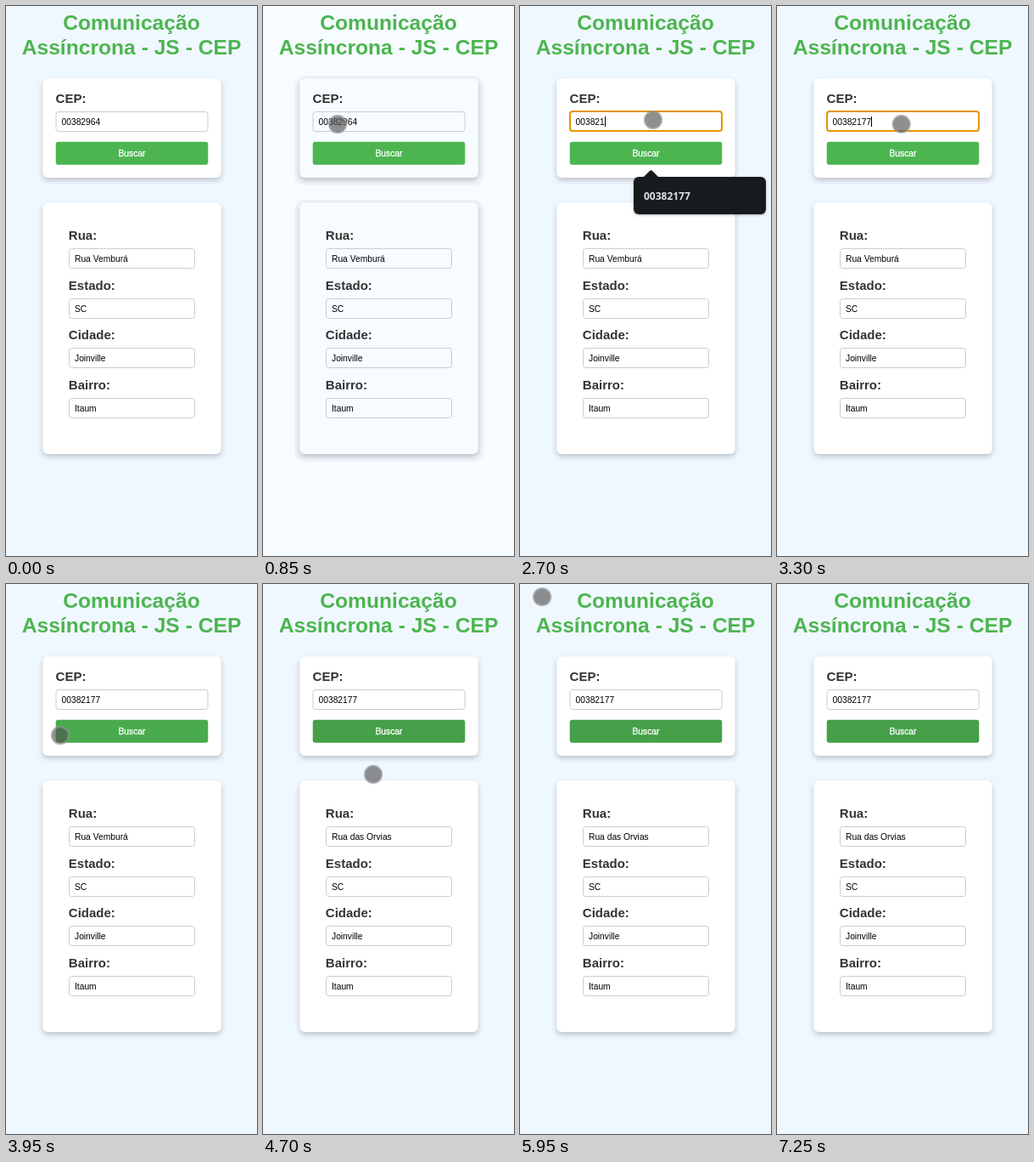
An HTML page for the animation above (7500 ms loop, 296x647 px).

```html
<!DOCTYPE html>
<html lang="pt-BR">
<head>
<meta charset="utf-8">
<title>CEP</title>
<style>
  html, body { margin: 0; width: 100%; height: 100%; overflow: hidden; background: #f0f8ff; }
  svg { display: block; width: 296px; height: 647px; font-family: "Liberation Sans", Arial, sans-serif; }
  .page { fill: #f0f8ff; }
  .title { font-size: 24.64px; font-weight: bold; fill: #4cb550; text-anchor: middle; }
  .label { font-size: 15px; font-weight: bold; fill: #333; }
  .value { font-size: 10.27px; fill: #000; }
  .card { fill: #fff; filter: drop-shadow(.5px 3px 3.1px rgba(0, 0, 0, .22)); }
  .halo { fill: none; }
  .field { fill: #fff; stroke: #ccc; }
  .pale .page, .pale .card, .pale .field { fill: #f6fcff; }
  .pale .halo { fill: #eff5fb; }
  .ring { fill: none; stroke: #e59700; stroke-width: 2; }
  .action { font-size: 10.27px; fill: #fff; stroke: #fff; stroke-width: .3; text-anchor: middle; }
  .popup { fill: #161b1d; filter: drop-shadow(0 1px 1.5px rgba(0, 0, 0, .3)); }
  .option { font: 700 12px "Open Sans", sans-serif; fill: #dce3e6; }
  .pointer { fill: rgba(80, 80, 80, .64); stroke: rgba(150, 150, 150, .62); stroke-width: 2.4; }
</style>
</head>
<body>
<svg id="stage" viewBox="0 0 296 647"></svg>
<script>
const LOOP = 7500, STEP = 50;
const OLD_CEP = '00382964', NEW_CEP = '00382177';
const OPTIONS = [OLD_CEP, NEW_CEP, '00382540'];
const OLD_STREET = 'Rua Vemburá', NEW_STREET = 'Rua das Orvias';
const FOCUS = 1200, BLUR = 3850, RESULT = 4300;
const ERASE = { start: 1925, gap: 225 }, TYPE = { start: 2700, gap: 175 };

// pointer moves; it rests where the last one ended
const ENTRY = { x: 22, y: 0 };
const MOVES = [
  { from: 300, to: 450, x: 60, y: 113 },
  { from: 600, to: 850, x: 88, y: 139 },
  { from: 850, to: 1000, x: 110, y: 138 },
  { from: 1200, to: 1550, x: 157, y: 134 },
  { from: 3250, to: 3700, x: 64, y: 178 },
  { from: 4400, to: 4700, x: 130, y: 224 },
  { from: 4700, to: 5050, x: 98, y: 461 },
  { from: 5050, to: 5350, x: 75, y: 197 },
  { from: 5350, to: 6000, ...ENTRY }
];

const stage = document.getElementById('stage');
const clamp = (v, max = 1) => Math.min(max, Math.max(0, v));
const lerp = (a, b, k) => a + (b - a) * k;

function add(parent, tag, attrs, text) {
  const el = document.createElementNS('http://www.w3.org/2000/svg', tag);
  for (const key in attrs) el.setAttribute(key, attrs[key]);
  if (text) el.textContent = text;
  parent.appendChild(el);
  return el;
}

function show(el, on) {
  el.style.display = on ? '' : 'none';
}

function write(el, text) {
  if (el.textContent !== text) el.textContent = text;
}

function box(parent, cls, x, y, width, height, rx) {
  return add(parent, 'rect', { class: cls, x, y, width, height, rx });
}

function label(cls, x, y, text, parent = stage) {
  return add(parent, 'text', { class: cls, x, y }, text);
}

function card(y, height) {
  box(stage, 'halo', 37, y - 3, 223.5, height + 12, 12);
  box(stage, 'card', 43.3, y + .3, 210.4, height - .3, 6);
}

function field(x, y, width, text) {
  box(stage, 'field', x + .5, y + .5, width - 1, 23, 3);
  return label('value', x + 7, y + 16, text);
}

box(stage, 'page', 0, 0, 296, 647, 0);
card(85, 117);
card(231, 296);

label('title', 148, 28, 'Comunicação');
label('title', 148, 56.6, 'Assíncrona - JS - CEP');

label('label', 58.6, 114, 'CEP:');
const cep = field(58.5, 124, 180, OLD_CEP);
const ring = box(stage, 'ring', 59, 124, 179, 23, 3);
const caret = box(stage, 'value', 0, 130, 1, 12, 0);

const button = box(stage, 'button', 58.7, 159.7, 179.6, 27, 3);
label('action', 148.5, 177.2, 'Buscar');

const ROWS = { Rua: OLD_STREET, Estado: 'SC', Cidade: 'Joinville', Bairro: 'Itaum' };
const [street] = Object.entries(ROWS).map(([name, value], i) => {
  const y = i * 58.55;
  label('label', 73.8, 275.3 + y, name + ':');
  return field(74, Math.round(285 + y), 149, value);
});

const popup = add(stage, 'g', { class: 'popup' });
add(popup, 'path', { d: 'M145 202L153 194Q154.500 192.500 156 194L164 202Z' });
const panel = box(popup, 'panel', 134, 201, 156, 44, 6);
const choices = OPTIONS.map((_, i) => label('option', 146, 228 + 36 * i, '', popup));

const pointer = add(stage, 'circle', { class: 'pointer', r: 10 });

function pointerAt(t) {
  let spot = ENTRY;
  for (const { from, to, x, y } of MOVES) {
    const k = clamp((t - from) / (to - from));
    spot = { x: lerp(spot.x, x, k), y: lerp(spot.y, y, k) };
  }
  return spot;
}

function keyCount(t, { start, gap }) {
  return clamp(Math.floor((t - start) / gap) + 1, 3);
}

function renderInput(t) {
  const erased = keyCount(t, ERASE), typed = keyCount(t, TYPE);
  const length = 8 - erased + typed;
  const value = (typed ? NEW_CEP : OLD_CEP).slice(0, length);
  write(cep, value);

  let lastKey = FOCUS;
  if (erased) lastKey = ERASE.start + ERASE.gap * (erased - 1);
  if (typed) lastKey = TYPE.start + TYPE.gap * (typed - 1);
  const focused = t >= FOCUS && t < BLUR;
  show(ring, focused);
  show(caret, focused && (t - lastKey) % 1000 < 500);
  caret.setAttribute('x', Math.round(65.4 + length * 5.71));

  const matches = erased ? OPTIONS.filter(o => o !== value && o.startsWith(value)) : [];
  show(popup, matches.length);
  panel.setAttribute('height', 8 + 36 * matches.length);
  choices.forEach((el, i) => write(el, matches[i] || ''));
}

function render(t) {
  stage.classList.toggle('pale', t >= 600 && t < TYPE.start);
  renderInput(t);

  const hover = clamp((t - BLUR) / 200);
  button.setAttribute('fill', `rgb(${lerp(76, 69, hover)},${lerp(181, 160, hover)},${lerp(80, 73, hover)})`);
  write(street, t < RESULT ? OLD_STREET : NEW_STREET);

  const { x, y } = pointerAt(t);
  show(pointer, t >= MOVES[0].from && t < MOVES[MOVES.length - 1].to);
  pointer.setAttribute('cx', x);
  pointer.setAttribute('cy', y);
}

const start = performance.now();
function tick() {
  const t = (performance.now() - start) % LOOP;
  render(Math.floor(t / STEP) * STEP);
  requestAnimationFrame(tick);
}
tick();
</script>
</body>
</html>
```
